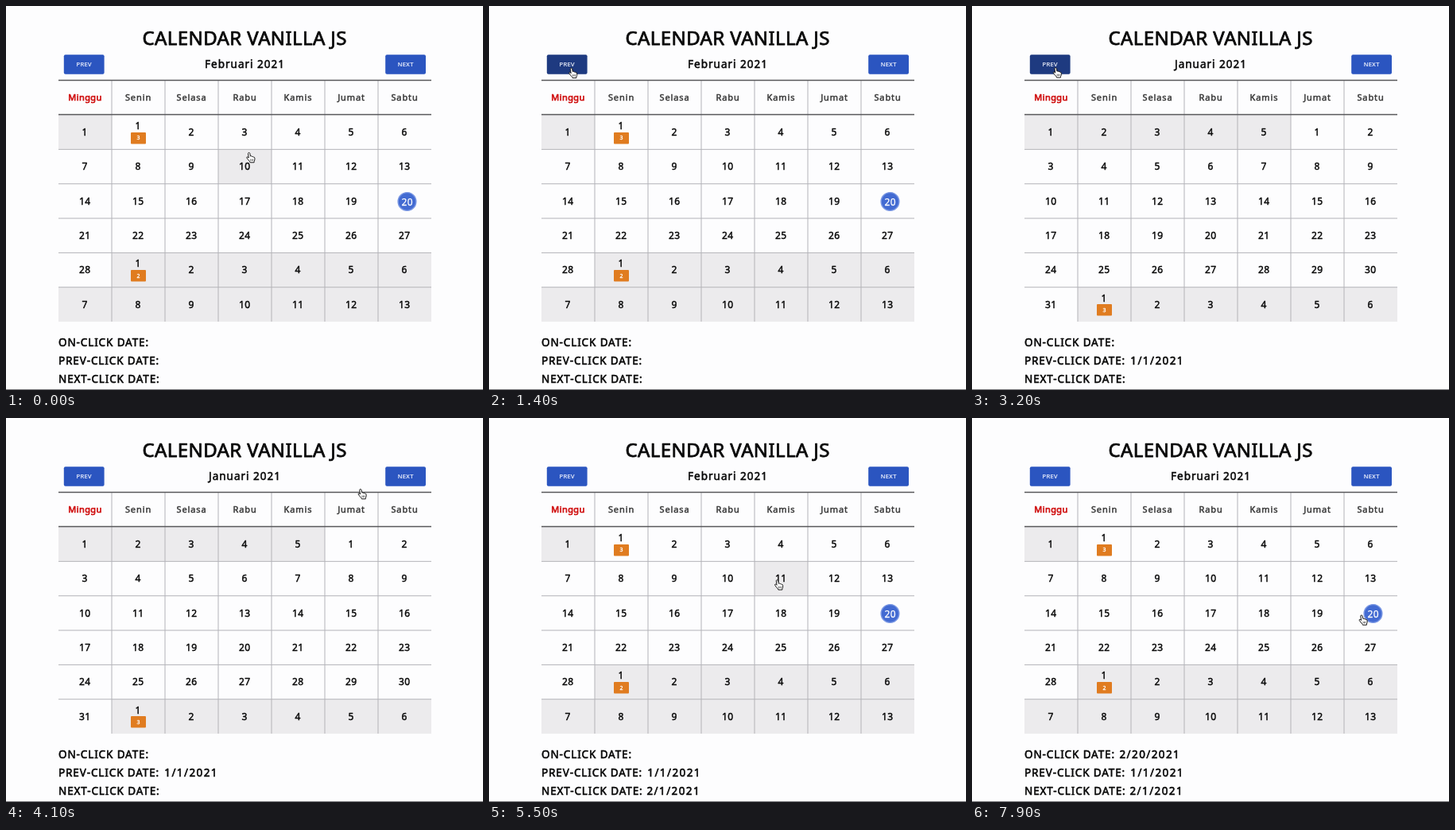
Animation of 600x483 px, one loop 8 s. Source, as an HTML page:

```html
<!DOCTYPE html>
<html lang="id">
<head>
<meta charset="utf-8">
<title>Calendar Vanilla JS</title>
<style>
  html, body { margin: 0; width: 100%; height: 100%; overflow: hidden; background: #fdfdfe; }
  svg { display: block; width: 600px; height: 483px; }
  text {
    --ink: #080808;
    font: 400 12px "Noto Sans", "Open Sans", sans-serif;
    fill: var(--ink); stroke: var(--ink); stroke-width: .45px; stroke-linejoin: round;
  }
  .mid { text-anchor: middle; }
  .title { font-size: 24px; letter-spacing: .4px; stroke-width: .75px; }
  .month { font-size: 13.5px; letter-spacing: 1px; stroke-width: .55px; }
  .head { --ink: #3a3a3a; font-size: 11px; letter-spacing: .9px; stroke-width: .5px; }
  .sun { --ink: #d01212; letter-spacing: .4px; stroke-width: .7px; }
  .day { letter-spacing: .4px; }
  .light { --ink: #fff; stroke-width: .25px; }
  .tag { --ink: #fff; font-size: 7px; stroke-width: .3px; }
  .btn { --ink: #f4f6ff; font-size: 7.5px; letter-spacing: .4px; stroke-width: .2px; }
  .log { font-size: 13.5px; letter-spacing: .88px; stroke-width: .6px; }
  .date { letter-spacing: 1.4px; }
</style>
</head>
<body>
<svg id="stage" viewBox="0 0 600 483"></svg>
<script>
const LOOP = 8000, LEFT = 66, TOP = 137, COL = 67, ROW = 43.35;
const SHADE = '#ecebed', PAPER = '#fdfdfe';
const stage = document.getElementById('stage');

function add(parent, tag, attrs, text) {
  const el = document.createElementNS('http://www.w3.org/2000/svg', tag);
  for (const key in attrs) el.setAttribute(key, attrs[key]);
  if (text !== undefined) el.textContent = text;
  parent.append(el);
  return el;
}
const box = (parent, x, y, width, height, fill, rx = 0) =>
  add(parent, 'rect', { x, y, width, height, fill, rx });
const label = (parent, x, y, cls, text) => add(parent, 'text', { x, y, class: cls }, text);

label(stage, 300.2, 49, 'mid title', 'CALENDAR VANILLA JS');
const monthName = label(stage, 300.5, 78, 'mid month', '');

function button(x, text) {
  const el = box(stage, x, 61.2, 50.8, 24.5, '#2b55c0', 2);
  label(stage, x + 25.5, 76, 'mid btn', text);
  return { el, x };
}
const buttons = [button(72.8, 'PREV'), button(477.2, 'NEXT')];

// A month page: trailing days, own days, then the following month
function page(name, lead, days, tags, today) {
  const group = add(stage, 'g', {});
  const cells = [];
  for (let i = 0; i < 42; i++) {
    const other = i < lead || i >= lead + days;
    const x = LEFT + i % 7 * COL, y = TOP + Math.floor(i / 7) * ROW;
    const el = box(group, x, y, COL, ROW, other ? SHADE : PAPER);
    cells.push({ el, other, today: i === today });
  }
  for (let i = 0; i < 42; i++) {
    const n = i < lead ? i + 1 : (i - lead) % days + 1;
    const cx = LEFT + (i % 7 + .5) * COL - .3, cy = TOP + (Math.floor(i / 7) + .5) * ROW;
    if (i === today) {
      add(group, 'circle', { cx: 504.5, cy: 246, r: 11.4, fill: '#436bd2', stroke: '#7d9ae4', 'stroke-width': 1.4 });
      label(group, 504.7, 250.5, 'mid day light', n);
    } else if (tags[i]) {
      label(group, cx, cy - 3.7, 'mid day', n);
      box(group, Math.round(cx - 9.2), Math.round(cy), 19, 14.5, '#e07c20', 1);
      label(group, cx + .2, cy + 9.8, 'mid tag', tags[i]);
    } else {
      label(group, cx, cy + 4.4, 'mid day', n);
    }
  }
  return { name, group, cells };
}
const february = page('Februari 2021', 1, 28, { 1: 3, 29: 2 }, 20);
const january = page('Januari 2021', 5, 31, { 36: 3 }, -1);

for (let c = 1; c < 7; c++) box(stage, LEFT + c * COL - .5, 94, 1, 303, '#b4b4b8');
for (let r = 1; r < 6; r++) box(stage, LEFT, TOP + r * ROW - .5, 469, 1, '#b4b4b8');
box(stage, LEFT, 92.7, 469, 1.5, '#58585a');
box(stage, LEFT, 135.8, 469, 1.5, '#58585a');
['Minggu', 'Senin', 'Selasa', 'Rabu', 'Kamis', 'Jumat', 'Sabtu'].forEach((name, i) =>
  label(stage, LEFT + (i + .5) * COL, 119, 'mid head' + (i ? '' : ' sun'), name));

function log(y, name, x) {
  label(stage, LEFT, y, 'log', name + '-CLICK DATE:');
  return label(stage, x, y, 'log date', '');
}
const onDate = log(428, 'ON', 185.5);
const prevDate = log(451, 'PREV', 199.3);
const nextDate = log(474, 'NEXT', 198.5);
box(stage, 0, 482, 600, 1, '#77777a');

const hand = add(stage, 'g', { stroke: '#181818', 'stroke-linejoin': 'round' });
add(hand, 'path', {
  fill: '#fff',
  d: 'M-1 1q.2-1.2 1.3-1q.8.1 1 1l.7 3.4q1.6-.6 2 .5q1.4-.4 1.8.7q1.5-.2 1.6 1.2q.2 3-.8 4.2v1.3h-5l-.3-1q-2.2-2.3-3.8-4.6q-.6-1.3.6-1.4q.9.1 1.7 1.2z'
});
add(hand, 'path', { fill: 'none', 'stroke-width': .6, d: 'M2.2 8v2.4M3.7 8v2.4M5.2 8v2.4' });

// Pointer route: time, x, y
const route = [
  [0, 305.5, 184.5], [300, 304, 183], [800, 193.5, 158.5], [900, 112, 83], [1200, 103, 78], [2100, 104.5, 78.5],
  [3400, 105, 77.5], [3700, 190, 100], [4000, 400, 104], [4200, 491.5, 75], [4900, 491.5, 74.5],
  [5300, 420, 165], [5700, 304.5, 242.5], [6400, 305, 243.5], [6900, 305, 243.5], [7500, 489, 248], [8000, 490, 248]
];
function pointer(t) {
  const i = route.findIndex(p => p[0] > t);
  const [t0, x0, y0] = route[i - 1], [t1, x1, y1] = route[i];
  const k = (t - t0) / (t1 - t0);
  return [x0 + (x1 - x0) * k, y0 + (y1 - y0) * k];
}

function draw(t) {
  const [x, y] = pointer(t);
  const current = t >= 2500 && t < 4500 ? january : february;
  for (const p of [february, january]) p.group.style.display = p === current ? '' : 'none';
  monthName.textContent = current.name;

  const col = Math.floor((x - LEFT) / COL), row = Math.floor((y - TOP) / ROW);
  const hovered = row >= 0 && row < 6 && col >= 0 && col < 7 ? row * 7 + col : -1;
  current.cells.forEach((cell, i) =>
    cell.el.setAttribute('fill', cell.other || (i === hovered && !cell.today) ? SHADE : PAPER));
  for (const b of buttons) {
    const over = x >= b.x && x <= b.x + 51 && y >= 61 && y <= 86;
    b.el.setAttribute('fill', over ? '#1e3a80' : '#2b55c0');
  }

  onDate.textContent = t >= 7600 ? '2/20/2021' : t >= 6100 ? '2/17/2021' : '';
  prevDate.textContent = t >= 2500 ? '1/1/2021' : '';
  nextDate.textContent = t >= 4500 ? '2/1/2021' : '';
  hand.setAttribute('transform', `translate(${x} ${y})`);
}

const start = performance.now();
function tick() {
  const t = (performance.now() - start) % LOOP;
  draw(Math.floor(t / 100) * 100);
  requestAnimationFrame(tick);
}
draw(0);
requestAnimationFrame(tick);
</script>
</body>
</html>
```
